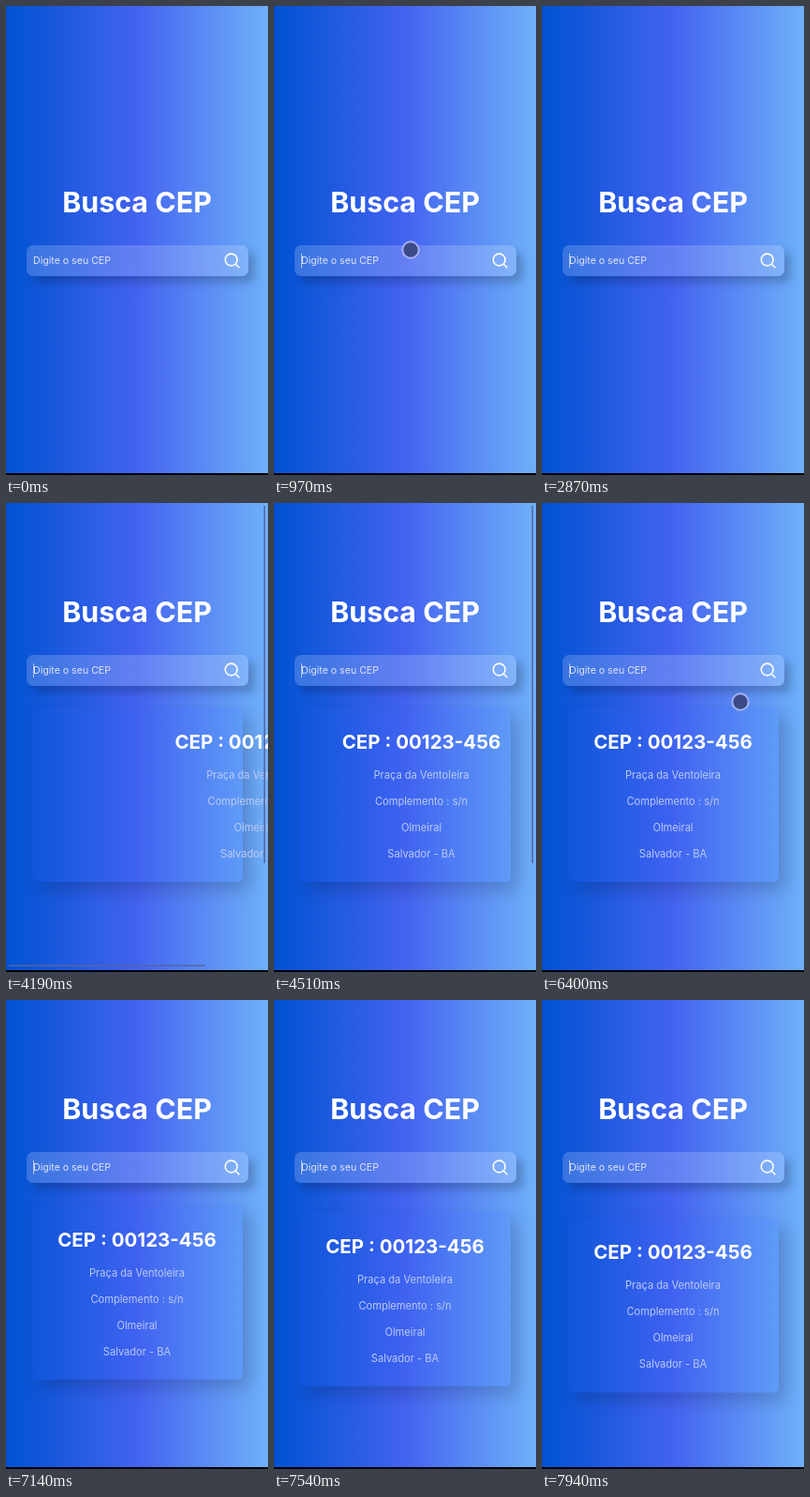
An HTML page for the animation above (8000 ms loop, 280 px wide and 500 px high).

```html
<!DOCTYPE html>
<html lang="pt-BR">
<head>
<meta charset="utf-8">
<title>Busca CEP</title>
<style>
  html, body { margin: 0; width: 100%; height: 100%; overflow: hidden; }
  #stage {
    position: relative; width: 280px; height: 500px; overflow: hidden;
    background: linear-gradient(to right, #0052d2, #4363f0, #6fb0f9);
  }
  #stage > div, .box, svg { position: absolute; }
  #search, #card { left: 0; top: 0; width: 280px; height: 500px; }
  svg { left: 0; top: 0; overflow: visible; }
  text { font-family: Poppins, Inter, sans-serif; fill: #fff; }
  .field {
    left: 22px; top: 254.5px; width: 236.5px; height: 33.5px; border-radius: 7px;
    background: rgba(235, 238, 255, .2);
    box-shadow: 7px 7px 10px rgba(0, 0, 0, .2);
  }
  .panel {
    left: 28px; top: 218px; width: 224.5px; height: 186px; border-radius: 5px;
    background: rgba(30, 90, 235, .09);
    box-shadow: 8px 9px 18px rgba(0, 0, 0, .17);
  }
  .title { font-size: 30.4px; font-weight: 700; text-anchor: middle; }
  .hint { font-size: 10.6px; fill: #dfe5fc; }
  .code { font-size: 20.5px; font-weight: 700; text-anchor: middle; }
  .line { font-size: 11.1px; text-anchor: middle; fill: #bccaf8; }
  .icon { fill: none; stroke: #fff; stroke-width: 1.6; stroke-linecap: round; }
  #bars { fill: #55659f; }
  #floor { left: 0; top: 498px; width: 280px; height: 2px; background: #000; }
</style>
</head>
<body>
<div id="stage">
  <div id="card">
    <div class="box panel"></div>
    <svg width="280" height="500">
      <g id="info">
        <text class="code" x="140" y="262">CEP : 00123-456</text>
        <text class="line" x="140" y="294">Praça da Ventoleira</text>
        <text class="line" x="140" y="322">Complemento : s/n</text>
        <text class="line" x="140" y="350">Olmeiral</text>
        <text class="line" x="140" y="378">Salvador - BA</text>
      </g>
    </svg>
  </div>
  <div id="search">
    <div class="box field"></div>
    <svg width="280" height="500">
      <text class="title" x="140" y="220">Busca CEP</text>
      <text class="hint" x="29" y="275">Digite o seu CEP</text>
      <rect id="caret" x="29" y="264" width="1" height="15" fill="#b4c6f3"/>
      <g class="icon">
        <circle cx="240.7" cy="270.5" r="6.4"/>
        <path d="M245.4 275.2L249 278.8"/>
      </g>
    </svg>
  </div>
  <svg width="280" height="500">
    <g id="bars">
      <rect x="275.5" y="3" width="1.5" height="381"/>
      <rect id="hbar" x="3" y="492.5" height="1.5"/>
    </g>
    <circle id="touch" fill="#3c4a86" stroke="#a5b1f6" stroke-width="2"/>
  </svg>
  <div id="floor"></div>
</div>
<script>
const LOOP = 8000, STEP = 80;
const TAP = 490, FOCUS = 890, LIFT = 2870, RESULT = 4110, TAP2 = 6400, FLOAT = 7140;
const el = id => document.getElementById(id);
const [card, info, search, caret, bars, hbar, touch] =
  ['card', 'info', 'search', 'caret', 'bars', 'hbar', 'touch'].map(el);
const clamp = x => Math.max(0, Math.min(1, x));
const show = (node, on) => { node.style.visibility = on ? 'visible' : 'hidden'; };

// Time since start, held in 80 ms steps.
const since = (t, start) => Math.floor((t - start) / STEP) * STEP;

// The standard "ease" timing curve, solved for its parameter by bisection.
function ease(x) {
  const curve = (a, b, u) => 3 * a * u * (1 - u) ** 2 + 3 * b * u * u * (1 - u) + u ** 3;
  let lo = 0, hi = 1;
  for (let i = 0; i < 20; i++) {
    const mid = (lo + hi) / 2;
    if (curve(.25, .25, mid) < x) lo = mid; else hi = mid;
  }
  return curve(.1, 1, lo);
}

function placeTouch(x, y, r, opacity) {
  touch.setAttribute('cx', x);
  touch.setAttribute('cy', y);
  touch.setAttribute('r', r);
  touch.setAttribute('opacity', opacity);
}

function draw(t) {
  const found = t >= RESULT;
  search.style.transform = `translateY(${found ? -93 : 0}px)`;
  show(caret, t >= FOCUS);
  show(card, found);

  const slide = 150 * (1 - ease(clamp((since(t, RESULT) + 18) / 700)));
  info.setAttribute('transform', `translate(${slide} 0)`);
  const drop = t < FLOAT ? 0 : (since(t, FLOAT) + 50) * .017;
  card.style.transform = `translateY(${drop}px)`;

  show(bars, found && t < RESULT + 720);
  bars.setAttribute('opacity', clamp((RESULT + 720 - t) / 300));
  hbar.setAttribute('width', slide > 40 ? 274 * 280 / (240 + slide) : 0);

  const first = t >= TAP && t < LIFT, second = t >= TAP2 && t < TAP2 + 2 * STEP;
  show(touch, first || second);
  if (first) {
    const p = clamp(since(t, TAP) / 480);
    placeTouch(192 - 46 * p, 148 + 112 * p, 8.7, 1);
  } else if (second) {
    const grown = since(t, TAP2) > 0;
    placeTouch(212, 212, grown ? 12.5 : 8.7, grown ? .4 : 1);
  }
}

const begin = performance.now();
function frame() {
  draw((performance.now() - begin) % LOOP);
  requestAnimationFrame(frame);
}
frame();
</script>
</body>
</html>
```
